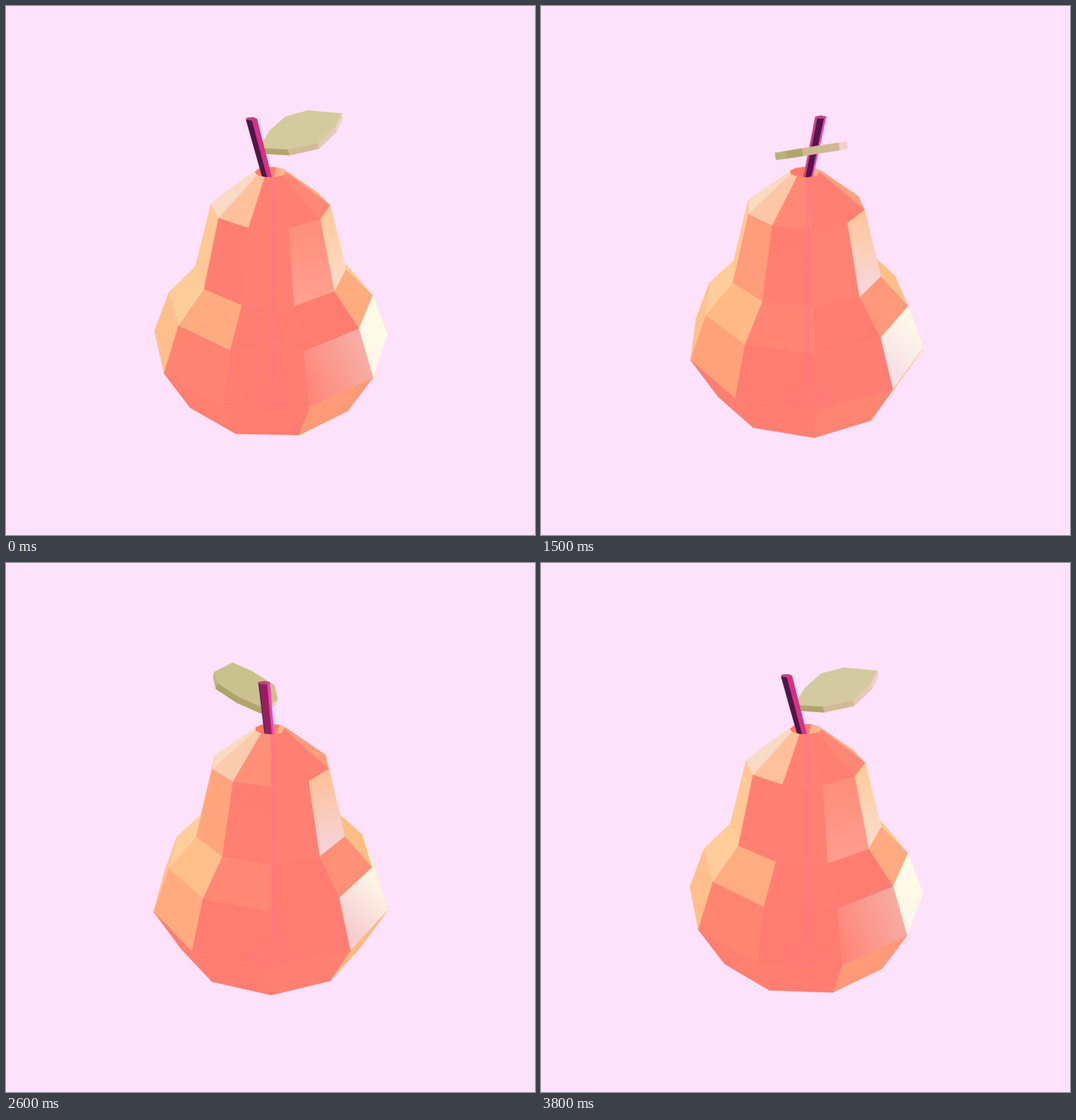
These frames come from a looping animation (748x748 px, 3.9 s). An HTML page:

```html
<!DOCTYPE html>
<html lang="en">
<head>
<meta charset="utf-8">
<title>Turning pear</title>
<style>
html, body { margin: 0; width: 100%; height: 100%; overflow: hidden; background: #fee2fb; }
svg { display: block; width: 100vw; height: 100vh; }
</style>
</head>
<body>
<svg id="stage" viewBox="0 0 748 748"></svg>
<script>
const stage = document.getElementById('stage');
const LOOP = 3900, STEP = 100, TURN = 361.5;
const FOCAL = 870, PITCH = 28.2 * Math.PI / 180, CX = 373.9, CY = 374;
const SIDES = 10;

const sin = a => Math.sin(a * Math.PI / 180);
const cos = a => Math.cos(a * Math.PI / 180);
const wrap = a => ((a + 180) % 360 + 360) % 360 - 180;

// Radius and height of each ring, from the opening down to the base
const rings = [[20.7, 145.3], [79.9, 99.5], [106.6, 3.4], [147.3, -38.7], [174.3, -105.9], [139.9, -182.3]];

// Colour ramps by the direction a facet faces: 0 is the viewer, 90 is right
function ramp(text) {
  const stops = text.split(',').map(s => {
    const [at, hex] = s.trim().split(' ');
    return { at: +at, rgb: [0, 2, 4].map(i => parseInt(hex.substr(i, 2), 16)) };
  });
  return a => {
    let i = 0;
    while (i < stops.length - 2 && a > stops[i + 1].at) i++;
    const p = stops[i], q = stops[i + 1];
    const k = Math.min(1, Math.max(0, (a - p.at) / (q.at - p.at)));
    return `rgb(${p.rgb.map((v, n) => Math.round(v + (q.rgb[n] - v) * k))})`;
  };
}

const crown = ramp('-95 f8dcbc, -70 f9dac8, -50 fcc8a8, -38 ffc09a, -26 ffac82, -16 ff8b76, 0 ff7f73, 60 ff7f73, 75 ff8c76, 105 ffab84');
const neckTop = ramp('-100 ffc996, -74 ffc895, -62 ffb686, -50 ff9e7a, -38 ff7e72, 22 ff7f73, 34 ff8e7c, 46 ffa990, 56 ffc69c, 70 ffcb9c, 90 ffcb94');
const neckEnd = ramp('-100 ffc996, -74 ffc895, -62 ffb686, -50 ff9e7a, -38 ff7e72, 22 ff8073, 34 ff9f8e, 46 f7c2b6, 56 f4d6dc, 68 fbdccc, 85 ffcf98');
const waist = ramp('-100 fdcf9c, -62 ffcb98, -50 ffba86, -38 ffab82, -26 ff967b, -16 ff8573, 0 ff7d71, 46 ff7b6f, 56 ff9478, 70 ffab80, 85 ffb880, 110 ffcd92');
const belly = ramp('-100 ffc493, -62 ffbd8a, -50 ffa47a, -38 ff8371, -26 ff7c70, 22 ff7d72, 28 ff8679, 34 fc9385, 46 f4c0bb, 54 f8e0e4, 62 fdf4e6, 72 fffdf0, 90 fff6cc');
const foot = ramp('-75 ff8070, 10 ff7d71, 20 ff8072, 34 ff9a78, 46 ffb080, 60 ffbe88, 85 ffe0a8');
const inside = ramp('-180 ff7a68, 90 ff7a68, 105 ffbc90, 145 ffb088, 160 ff7f6c');
const bark = ramp('-80 c9408a, -62 5a1850, -50 4f1646, -12 4f1646, -5 5c1650, 8 92205f, 26 d9378a, 41 d92f86, 59 f540b8, 80 ff3fae');
const leafTop = ramp('-180 c2bc88, -156 c9c28e, -103 d3cc98, -7 e0d4b4, 73 dfd3b8, 112 d3cb9e, 160 bdb883, 180 c2bc88');
const leafRim = ramp('-90 c8c088, -45 aca368, -15 b0a66c, 5 d6bd9a, 33 d0b894, 60 f3cfcb');

// Each band gives the two end colours of its facets; belly shades run sideways
const bands = [
  a => [crown(a)],
  a => [neckTop(a), neckEnd(a)],
  a => [waist(a)],
  a => a > 26 && a < 85 ? [belly(a - 5), belly(a + 7), true] : [belly(a)],
  a => [foot(a)]
];

// x to the right, h up, z towards the viewer
function project([x, h, z]) {
  const s = FOCAL / (FOCAL - z * Math.cos(PITCH) - h * Math.sin(PITCH));
  return [CX + s * x, CY + s * (z * Math.sin(PITCH) - h * Math.cos(PITCH))];
}

function area(pts) {
  return pts.reduce((sum, p, i) => {
    const q = pts[(i + 1) % pts.length];
    return sum + p[0] * q[1] - q[0] * p[1];
  }, 0);
}

const poly = (pts, fill, extra = '') =>
  `<polygon points="${pts.map(p => p.map(v => v.toFixed(1))).join(' ')}" fill="${fill}" ${extra}/>`;
const facet = (pts, fill) => poly(pts, fill, `stroke="${fill}" stroke-width=".6" stroke-linejoin="round"`);
const polar = (r, h, a) => [r * sin(a), h, r * cos(a)];
const mid = (p, q) => [(p[0] + q[0]) / 2, (p[1] + q[1]) / 2];

function opening(turn) {
  let out = '';
  const [r, h] = rings[0], pit = project([0, 118, 0]);
  for (let j = 0; j < SIDES; j++) {
    const a = 16.2 + 36 * j - turn;
    const pts = [project(polar(r, h, a)), project(polar(r, h, a + 36)), pit];
    if (area(pts) < 0) out += facet(pts, inside(wrap(a + 18)));
  }
  return out;
}

function body(turn) {
  const faces = [];
  for (let j = 0; j < SIDES; j++) {
    const a = 16.2 + 36 * j - turn, face = wrap(a + 18);
    bands.forEach((shade, b) => {
      const [r, h] = rings[b], [r2, h2] = rings[b + 1];
      const pts = [polar(r, h, a), polar(r, h, a + 36), polar(r2, h2, a + 36), polar(r2, h2, a)].map(project);
      if (area(pts) > 0) faces.push({ pts, depth: cos(face), shade: shade(face), id: `g${j}-${b}` });
    });
  }
  faces.sort((p, q) => p.depth - q.depth);
  return faces.map(({ pts, shade, id }) => {
    const [from, to, across] = shade;
    if (!to || to === from) return facet(pts, from);
    const [p, q] = across
      ? [mid(pts[0], pts[3]), mid(pts[1], pts[2])]
      : [mid(pts[0], pts[1]), mid(pts[2], pts[3])];
    return `<linearGradient id="${id}" gradientUnits="userSpaceOnUse" x1="${p[0]}" y1="${p[1]}" x2="${q[0]}" y2="${q[1]}">` +
      `<stop stop-color="${from}"/><stop offset="1" stop-color="${to}"/></linearGradient>` + facet(pts, `url(#${id})`);
  }).join('');
}

// Height and lean of the stem: k runs from its root to its tip
const stemAt = (k, turn) => polar(25.9 * k, 120 + 92.8 * k, -110 - turn);

function stem(turn) {
  const ring = (k, r) => [0, 1, 2, 3, 4].map(j => {
    const c = stemAt(k, turn), v = polar(r, 0, -61 + 72 * j - turn);
    return project(c.map((n, i) => n + v[i]));
  });
  const top = ring(1, 7.3), root = ring(0, 6.2);
  const lean = cos(-114 - turn);
  let out = '';
  for (let j = 0; j < 5; j++) {
    const n = (j + 1) % 5, pts = [top[j], top[n], root[n], root[j]];
    if (area(pts) > 0) out += facet(pts, bark(wrap(-25 + 72 * j - turn) + 14 * lean));
  }
  return out + facet(top, '#c4407f');
}

const leafEdge = [[0, 0], [28, 28], [64, 40], [98, 21], [117, 0], [85, -38], [55, -45], [25, -28]];
const RISE = 0.287, ROLL = 0.2, THICK = 7.8;

function leaf(turn) {
  const dir = 112 - turn, root = stemAt(0.57, turn);
  // u runs along the leaf, v across it, w down through it
  const place = (u, v, w) => [
    root[0] + u * sin(dir) + v * sin(dir - 90),
    root[1] + 3 + u * RISE - v * ROLL - w,
    root[2] + u * cos(dir) + v * cos(dir - 90)
  ];
  const upper = leafEdge.map(([u, v]) => place(u, v, 0));
  const top = upper.map(project);
  const low = leafEdge.map(([u, v]) => {
    const p = place(u, v, THICK), q = place(THICK * RISE, -THICK * ROLL, 0);
    return project([p[0] + q[0] - root[0], p[1], p[2] + q[2] - root[2]]);
  });
  let out = facet(top, leafTop(wrap(dir)));
  top.forEach((p, i) => {
    const n = (i + 1) % top.length, pts = [p, top[n], low[n], low[i]];
    if (area(pts) <= 0) return;
    const dx = upper[n][0] - upper[i][0], dz = upper[n][2] - upper[i][2];
    out += facet(pts, leafRim(wrap(Math.atan2(dx, dz) * 180 / Math.PI - 90)));
  });
  return out;
}

// Faint core showing through the flesh
const core =
  poly([[372, 246], [380, 246], [379, 530], [371, 530]], '#f8748a', 'opacity=".2"') +
  poly([[376, 246], [380, 246], [379, 530], [376, 530]], '#f8748a', 'opacity=".3"') +
  poly([[338, 553], [357, 534], [375, 528], [395, 539], [411, 553], [396, 570], [352, 572]], '#ff7480', 'opacity=".16"');

function draw(time) {
  const k = time / LOOP, turn = TURN * k * k * (3 - 2 * k);
  const inFront = cos(112 - turn) > 0;
  const parts = inFront ? stem(turn) + leaf(turn) : leaf(turn) + stem(turn);
  stage.innerHTML = '<rect width="748" height="748" fill="#fee2fb"/>' + opening(turn) + parts + body(turn) + core;
}

let shown = -1;
function tick() {
  const step = Math.floor(performance.now() % LOOP / STEP);
  if (step !== shown) draw((shown = step) * STEP);
  requestAnimationFrame(tick);
}
tick();
</script>
</body>
</html>
```
